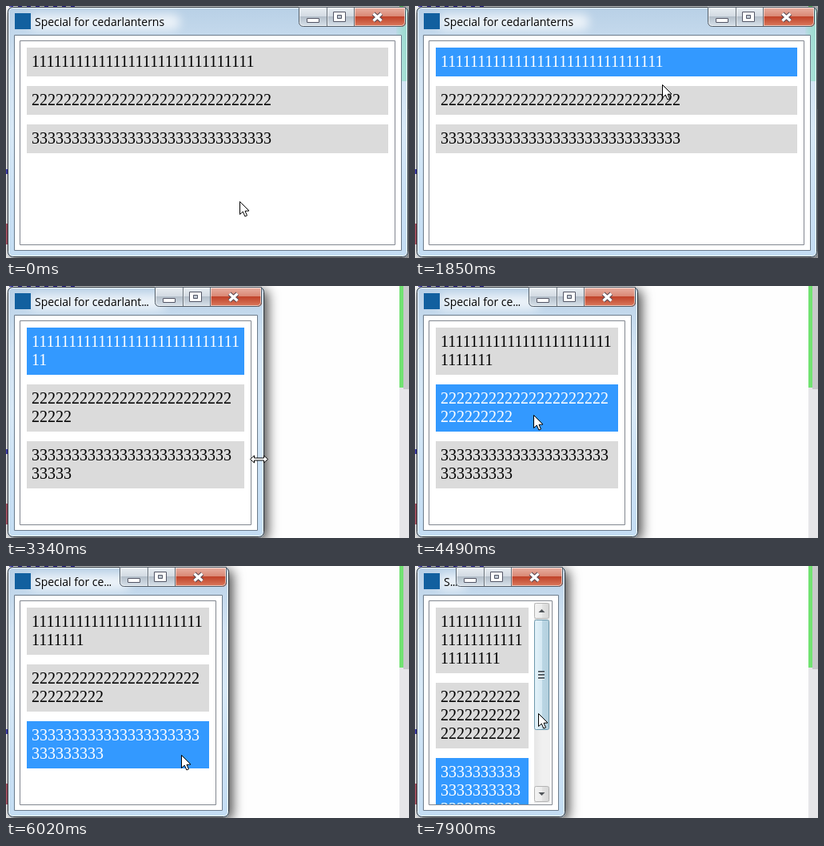
These frames come from a looping animation (504 px wide and 315 px high, 8 s). An HTML page with a canvas:

```html
<!DOCTYPE html>
<html lang="en">
<head>
<meta charset="utf-8">
<title>Resizable list</title>
<style>
html, body { margin: 0; width: 100%; height: 100%; overflow: hidden; background: #fff; }
canvas { display: block; width: 504px; height: 315px; }
</style>
</head>
<body>
<canvas id="stage" width="504" height="315"></canvas>
<script>
const ctx = document.getElementById('stage').getContext('2d');
const LOOP = 8000;
const TITLE = 'Special for cedarlanterns';
const TITLE_FONT = '14px "Open Sans", "Noto Sans", sans-serif';
const LIST_FONT = '20px "Liberation Serif", "Times New Roman", serif';

// Stepped pointer moves along Bezier paths; a third coordinate drags the window edge.
const MOVES = [
  { start: 530, end: 1550, steps: 9, path: [[292, 240], [305, 89]] },
  { start: 1700, end: 2450, steps: 6, path: [[308, 75], [244, 147.7], [560, 12], [492, 216]] },
  { start: 2760, end: 3760, steps: 8, path: [[486, 215, 488], [281, 215, 289], [274, 217, 278]] },
  { start: 4070, end: 5030, steps: 8, path: [[258, 200], [87, 165], [115, 80]] },
  { start: 5180, end: 6170, steps: 8, path: [[116, 160], [108, 256], [259, 232]] },
  { start: 6290, end: 7290, steps: 8, path: [[268, 229, 276], [242, 228, 272], [185, 229, 187]] },
  { start: 7750, end: 7900, steps: 2, path: [[168, 192], [154, 184]] }
];

function bezier(points, p) {
  while (points.length > 1) {
    points = points.slice(1).map((b, i) => b.map((v, n) => points[i][n] + (v - points[i][n]) * p));
  }
  return points[0];
}

// Wraps the three rows to the window width; adds a scroll bar when they overflow.
function layout(edge) {
  const wrap = right => {
    let y = 52;
    return ['1', '2', '3'].map(digit => {
      const pitch = digit === '1' ? 9.26 : 10; // ones are kerned
      const count = Math.max(1, Math.floor((right - 38.5) / pitch));
      const lines = Math.ceil(30 / count);
      const row = { digit, count, lines, y, height: 13 + 23 * lines };
      y += row.height + 12;
      return row;
    });
  };
  let right = edge - 24;
  let rows = wrap(right);
  const scrolls = rows[2].y + rows[2].height > 298;
  if (scrolls) rows = wrap(right -= 21);
  return { right, rows, scrolls, bar: edge - 38 };
}

// Replays the moves up to t; the row last touched stays selected.
function stateAt(t) {
  const s = { x: 292, y: 244, edge: 502, row: -1, drag: false };
  for (const { start, end, steps, path } of MOVES) {
    for (let i = 0; i < steps; i++) {
      const p = i / (steps - 1);
      if (start + (end - start) * p > t + 12) return s;
      const [x, y, edge = s.edge] = bezier(path, p);
      s.x = Math.round(x);
      s.y = Math.round(y);
      s.edge = Math.round(edge);
      s.drag = path[0].length > 2;
      if (s.drag) continue;
      const { rows, right } = layout(s.edge);
      const hit = rows.findIndex(r => x < right && y >= r.y && y < r.y + r.height);
      if (hit >= 0) s.row = hit;
    }
  }
  return s;
}

function rect(x, y, w, h, fill) {
  ctx.fillStyle = fill;
  ctx.fillRect(x, y, w, h);
}

function stroke(color, width = 1) {
  ctx.strokeStyle = color;
  ctx.lineWidth = width;
  ctx.stroke();
}

function box(x, y, w, h, fill, line) {
  rect(x, y, w, h, fill);
  ctx.beginPath();
  ctx.rect(x + .5, y + .5, w - 1, h - 1);
  stroke(line);
}

function rounded(x, y, w, h, r) {
  ctx.beginPath();
  ctx.roundRect(x, y, w, h, r);
}

function polygon(points) {
  ctx.beginPath();
  points.forEach(([x, y]) => ctx.lineTo(x, y));
  ctx.closePath();
}

// Evenly spaced colours from one point to another.
function blend(x0, y0, x1, y1, colors) {
  const g = ctx.createLinearGradient(x0, y0, x1, y1);
  colors.forEach((c, i) => g.addColorStop(i / (colors.length - 1), c));
  return g;
}

// Two blends that meet in a hard edge halfway.
function gloss(x0, y0, x1, y1, colors) {
  const g = ctx.createLinearGradient(x0, y0, x1, y1);
  colors.forEach((c, i) => g.addColorStop(Math.floor((i + 1) / 2) / 2, c));
  return g;
}

function desktop() {
  rect(0, 0, 504, 315, '#fefefe');
  rect(492, 0, 12, 315, '#e6e6e9');
  rect(492, 0, 5, 127, '#72e272');
  rect(497, 0, 7, 129, '#c8c8cb');
  for (let x = 4; x < 88; x += 11) rect(x, 0, 5, 1, '#4a3fc0');
  rect(0, 204, 2, 6, '#4a48c8');
  rect(0, 272, 2, 26, '#c06070');
}

function glass(edge) {
  const w = edge - 1;
  ctx.save();
  ctx.shadowColor = 'rgba(0,0,0,.75)';
  ctx.shadowBlur = 15;
  ctx.shadowOffsetX = ctx.shadowOffsetY = 4;
  rounded(2, 1, w, 313, 6);
  ctx.fillStyle = blend(0, 1, 0, 314, ['#b8d0e6', '#d3e4f4', '#d8e9f7', '#cbe1f5', '#c4ddf3']);
  ctx.fill();
  ctx.restore();

  ctx.save();
  rounded(2, 1, w, 313, 6);
  ctx.clip();
  // the green strip behind shows through
  rect(488, 2, 16, 92, blend(486, 0, 497, 0, ['rgba(140,225,195,0)', 'rgba(145,222,200,.7)']));
  const glow = Math.min(190, edge - 150);
  if (glow > 20) {
    ctx.filter = 'blur(6px)';
    rounded(28, 10, glow, 20, 10);
    ctx.fillStyle = 'rgba(255,255,255,.7)';
    ctx.fill();
  }
  ctx.restore();

  rounded(3.5, 2.5, w - 3, 310, 5);
  stroke('rgba(255,255,255,.75)');
  rounded(2.5, 1.5, w - 1, 312, 6);
  stroke('#27323c');
}

function caption(left, right) {
  rect(11, 9, 20, 20, '#12609f');
  ctx.font = TITLE_FONT;
  ctx.fillStyle = '#000';
  const room = right - left - 1;
  const width = s => ctx.measureText(s).width;
  if (width(TITLE) <= room) {
    ctx.fillText(TITLE, left, 25);
    return;
  }
  let text = TITLE.slice(0, -1);
  while (text.length > 1 && width(text + '...') > room) text = text.slice(0, -1);
  ctx.fillText(text, left, 25);
  const end = left + width(text);
  ctx.letterSpacing = '-0.7px';
  ctx.fillText('...', end, 25);
  ctx.letterSpacing = '0px';
}

function captionButtons(x) {
  ctx.save();
  rounded(x, 1, 134, 25, [0, 0, 5, 5]);
  ctx.clip();
  rect(x, 1, 70, 25, gloss(0, 1, 0, 26, ['#e9eef3', '#d2dae2', '#b4bfca', '#d9e3ec']));
  rect(x + 70, 1, 64, 25, gloss(0, 1, 0, 26, ['#eab3a6', '#d98672', '#c0432a', '#dc7d60']));
  ctx.restore();

  rounded(x + 1.5, 2.5, 131, 22, [0, 0, 4, 4]);
  stroke('rgba(255,255,255,.6)');
  rounded(x + .5, 1.5, 133, 24, [0, 0, 5, 5]);
  stroke('#535e69');
  for (const d of [35, 69]) {
    rect(x + d, 2, 1, 23, '#6b747d');
    rect(x + d + 1, 2, 1, 22, 'rgba(255,255,255,.5)');
  }

  const ink = '#535666';
  box(x + 10, 15, 16, 6, '#fff', ink);
  box(x + 43, 7, 16, 13, '#fff', ink);
  box(x + 48, 11, 6, 5, '#c3ccd5', ink);
  ctx.beginPath();
  for (const d of [-5, 5]) {
    ctx.moveTo(x + 98.5 - d, 9.5);
    ctx.lineTo(x + 98.5 + d, 18.5);
  }
  stroke('#5c4a52', 5.5);
  stroke('#fff', 3.3);
}

function list({ rows, right }, selected) {
  ctx.save();
  ctx.beginPath();
  ctx.rect(18, 44, right - 18, 254);
  ctx.clip();
  ctx.font = LIST_FONT;
  ctx.fontKerning = 'normal';
  rows.forEach(({ digit, count, lines, y, height }, i) => {
    const on = i === selected;
    rect(26, y, right - 26, height, on ? '#3399ff' : '#dbdbdb');
    ctx.fillStyle = on ? '#fff' : '#000';
    for (let n = 0; n < lines; n++) {
      ctx.fillText(digit.repeat(Math.min(count, 30 - n * count)), 32, y + 24 + n * 23);
    }
  });
  ctx.restore();
}

function scrollbar(x, hover) {
  rect(x, 46, 20, 250, blend(x, 0, x + 20, 0, ['#e6e6e6', '#f0f0f0', '#f0f0f0']));
  const part = (y, h, colors, line) => {
    rounded(x + .5, y + .5, 18, h - 1, 2);
    ctx.fillStyle = gloss(x, 0, x + 19, 0, colors);
    ctx.fill();
    stroke(line);
  };
  if (hover) {
    for (const y of [46, 275]) part(y, 20, ['#f4f4f4', '#ececec', '#e4e4e4', '#d6d6d6'], '#b4b4b4');
    part(67, 138, ['#e6f4fb', '#d5e9f3', '#bad6e4', '#b3cfdd'], '#6d98ac');
  } else {
    part(67, 138, ['#f5f5f5', '#e9e9eb', '#d9dadc', '#c6c7ca'], '#989898');
  }
  for (let y = 131; y < 141; y += 4) {
    rect(x + 5, y, 8, 2, '#59636b');
    rect(x + 5, y + 2, 8, 1, '#f4f8fa');
  }
  ctx.fillStyle = '#505458';
  for (const [y, d] of [[58, -4], [283, 4]]) {
    polygon([[x + 5.5, y], [x + 13.5, y], [x + 9.5, y + d]]);
    ctx.fill();
  }
}

function client({ edge, row, drag, x }) {
  const view = layout(edge);
  box(10, 36, edge - 17, 270, '#fff', '#6b7b8b');
  box(17, 43, edge - 32, 256, '#fff', '#828790');
  list(view, row);
  if (view.scrolls) scrollbar(view.bar, !drag && x >= view.bar);
}

function pointer({ x, y, drag }) {
  const arrow = [[0, 0], [0, 16], [3.8, 12.6], [6.4, 18.5], [9, 17.4], [6.5, 11.8], [11.5, 11.5]];
  const wing = [[-6, 1.5], [-6, 4.5], [-11, 0], [-6, -4.5], [-6, -1.5]];
  const shape = drag ? [...wing, ...wing.map(([a, b]) => [-a, -b])] : arrow;
  polygon(shape.map(([a, b]) => [x + a + .5, y + b + .5]));
  ctx.fillStyle = '#fff';
  ctx.fill();
  stroke('#000');
}

function draw(t) {
  const state = stateAt(t);
  const buttons = state.edge - 136;
  desktop();
  glass(state.edge);
  caption(36, buttons);
  captionButtons(buttons);
  client(state);
  pointer(state);
}

const begin = performance.now();
function tick() {
  draw((performance.now() - begin) % LOOP);
  requestAnimationFrame(tick);
}
tick();
</script>
</body>
</html>
```
